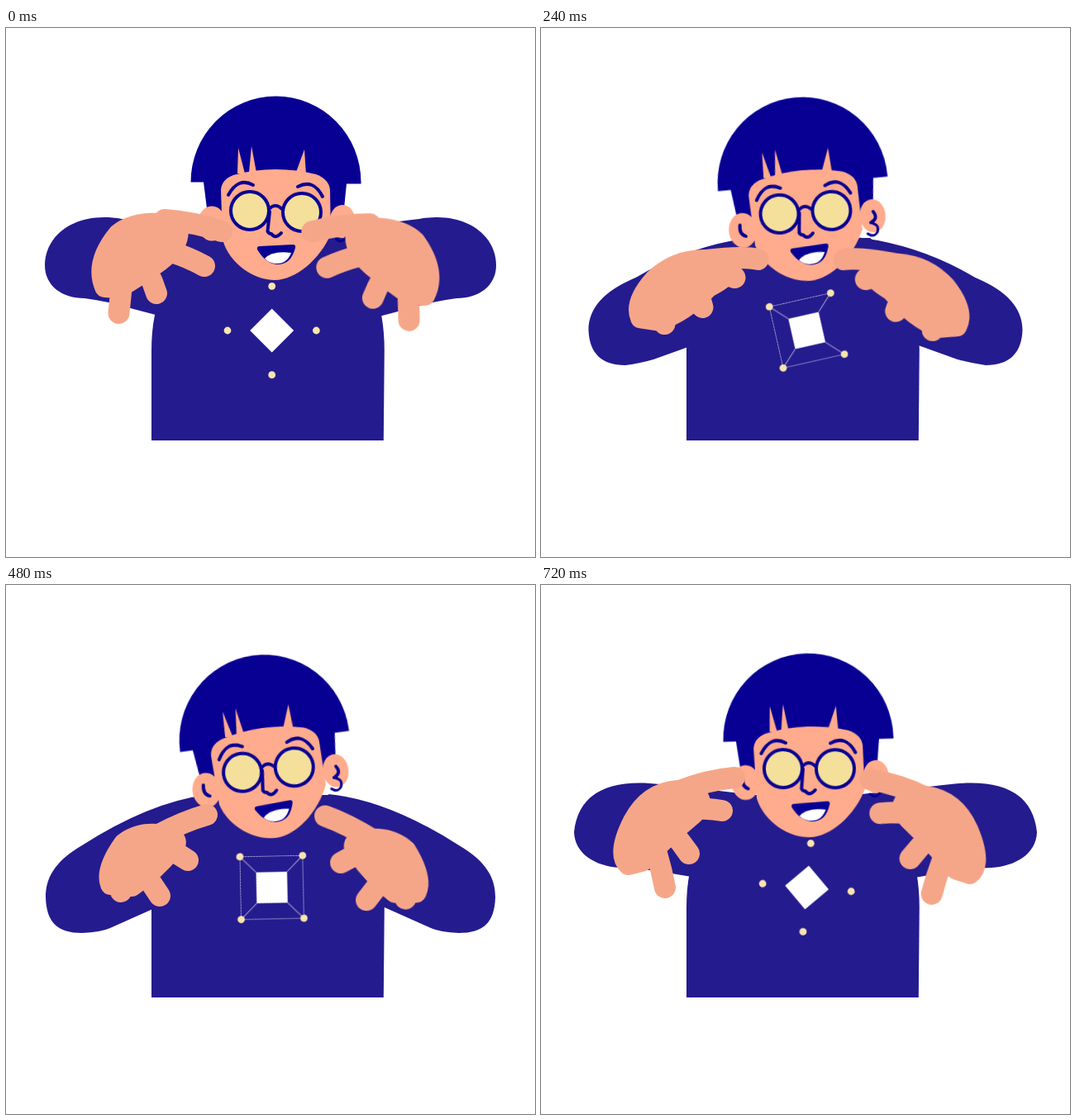
These frames come from a looping animation (640 px wide and 640 px high, 800 ms). An HTML page without scripts:

```html
<!DOCTYPE html>
<html lang="en">
<head>
<meta charset="utf-8">
<title>Waving hands</title>
<style>
html, body { margin: 0; width: 100%; height: 100%; overflow: hidden; background: #fff; }
svg { display: block; width: 100%; height: 100%; }

.sleeve, .hand, .head, .emblem, .frame, .spoke { animation: .8s step-end infinite; }
.cloth { fill: #241b8e; }
.hair { fill: #080093; }
.skin { fill: #ffab8d; }
.ink { fill: none; stroke: #080093; stroke-width: 4; stroke-linecap: round; stroke-linejoin: round; }
.lens { fill: #f4e09b; }
.dots { fill: #f8e5ae; }
.wire { fill: none; stroke: #fff; stroke-opacity: .6; }

/* Palm and four fingers, thickened by a round stroke */
.hand { fill: #f6a688; stroke: #f6a688; stroke-width: 26; stroke-linecap: round; stroke-linejoin: round; animation-name: hand; }
.sleeve { animation-name: sleeve; }
.head { transform-origin: 333px 290px; animation-name: nod; }
.emblem { transform-origin: 321.7px 366px; animation-name: turn; }
.frame { animation-name: trace; }
.spoke { visibility: hidden; }
.first { animation-name: spokes-first; }
.second { animation-name: spokes-second; }

/* Two-step spans hold each pose, then its halfway pose */
@keyframes hand {
  0% { animation-timing-function: steps(2, end);
    d: path("M120 313Q108 284 136 250Q156 232 207 238Q212 262 185 282Q160 300 136 314Z M192 232Q230 235 261 246 M200 271Q220 277 240 288 M172 296Q178 308 182 321 M140 310Q138 330 136.5 345"); }
  20% { animation-timing-function: steps(2, end);
    d: path("M114 337Q104 324 128 292Q160 260 200 260Q275 276 190 303Q165 322 137 330Z M195 261Q240 258 262 253 M205 284Q230 284 251 286 M190 312Q198 325 206 336 M145 325Q150 338 154 351"); }
  40% { animation-timing-function: steps(2, end);
    d: path("M128 364Q122 340 148 317Q168 300 200 302Q222 304 214 323Q178 368 145 377Z M205 301Q250 293 263 307 M205 305Q212 310 218 318 M190 325Q188 333 185 340 M150 350Q148 358 145 365"); }
  60% { d: path("M127 362Q120 345 143 313Q160 300 183 302Q215 305 200 320Q180 345 152 364Z M185 302Q215 286 243 278 M195 318Q208 325 220 333 M170 352Q178 364 186 376 M140 350Q140 360 139 371"); }
  70% { d: path("M126 372Q108 352 126 320Q148 295 178 296Q215 298 190 322Q170 342 150 360Z M175 295Q205 285 219 266 M190 307Q218 297 241 289 M180 322Q200 331 218 341 M145 345Q155 360 166 372"); }
  80% { d: path("M110 363Q92 350 112 312Q135 273 165 274Q205 275 180 297Q150 325 125 356Z M160 276Q190 256 210 242 M180 284Q210 284 234 285 M170 305Q180 314 191 322 M143 335Q150 352 156 367"); }
  90% { d: path("M106 338Q92 325 112 286Q130 252 165 249Q210 255 180 280Q150 305 122 334Z M165 250Q200 236 234 233 M175 270Q200 270 219 273 M160 300Q170 312 179 325 M140 325Q146 345 150 366"); }
}
@keyframes sleeve {
  0% { animation-timing-function: steps(2, end);
    d: path("M262 252Q190 236 140 231C85 221 47 250 47 287C47 312 68 327 95 327Q110 329 124 332L200 352Z"); }
  20% { animation-timing-function: steps(2, end);
    d: path("M260 254Q190 256 138 268C80 284 49 310 49 347C49 373 68 384 100 384Q120 380 140 376L200 368Z"); }
  40% { animation-timing-function: steps(2, end);
    d: path("M250 253Q170 270 93 335C72 352 66 368 66 384C68 415 80 432 104 432Q121 431 132 426L200 388Z"); }
  60% { d: path("M250 253Q178 260 92 315C58 335 48 355 48 378C49 408 62 421 92 421Q115 420 126 415L200 382Z"); }
  70% { d: path("M250 255Q165 262 88 286C45 300 25 325 25 358C26 388 45 398 75 398Q98 398 112 394L200 372Z"); }
  80% { d: path("M255 254Q165 252 110 255C50 258 25 285 21.5 325C22 350 50 365 92 368Q110 368 125 366L200 362Z"); }
  90% { d: path("M260 254Q190 246 144 241C85 234 45 250 40 299C41 325 65 340 95 342Q120 343 140 346L200 356Z"); }
}
@keyframes nod {
  0% { transform: rotate(0deg); }
  10% { transform: rotate(-1.1deg); }
  20% { transform: rotate(-2.9deg); }
  30% { transform: rotate(-5.5deg); }
  40%, 60% { transform: rotate(-7.7deg); }
  50% { transform: rotate(-8.3deg); }
  70% { transform: rotate(-6deg); }
  80% { transform: rotate(-3.7deg); }
  90% { transform: rotate(-1.7deg); }
}
@keyframes turn {
  0% { transform: rotate(0deg); }
  10%, 90% { transform: rotate(5deg); }
  20%, 80% { transform: rotate(17.4deg); }
  30%, 70% { transform: rotate(32.3deg); }
  40%, 60% { transform: rotate(43.8deg); }
  50% { transform: rotate(48deg); }
}
@keyframes trace {
  0%, 90% { stroke-dasharray: 0 9; stroke-dashoffset: 0; }
  10% { stroke-dasharray: .8 9; stroke-dashoffset: 0; }
  20% { stroke-dasharray: 2.22 9; stroke-dashoffset: 0; }
  30%, 50% { stroke-dasharray: 3 9; stroke-dashoffset: -1; }
  40% { stroke-dasharray: 1.78 9; stroke-dashoffset: -2.22; }
  60%, 70% { stroke-dasharray: 4 9; stroke-dashoffset: 0; }
  80% { stroke-dasharray: 1 9; stroke-dashoffset: 0; }
}
@keyframes spokes-first {
  0%, 40%, 80% { visibility: hidden; }
  20%, 50% { visibility: visible; }
}
@keyframes spokes-second {
  0%, 70% { visibility: hidden; }
  30% { visibility: visible; }
}
</style>
</head>
<body>
<svg viewBox="0 0 640 640">
  <g class="cloth">
    <path class="sleeve"/>
    <path class="sleeve" transform="translate(640) scale(-1 1)"/>
    <path d="M176 499V390C176 332 195 285 242 254H398C440 285 457.8 332 457.8 390L456.8 499Z"/>
  </g>

  <g class="emblem">
    <path fill="#fff" d="M321.7 339.5l26.5 26.5-26.5 26.5-26.5-26.5Z"/>
    <g class="wire">
      <path class="frame" pathLength="4" d="M321.7 312.3l53.7 53.7-53.7 53.7-53.7-53.7Z"/>
      <path class="spoke first" d="M348.2 366h27.2M321.7 392.5v27.2"/>
      <path class="spoke second" d="M295.2 366h-27.2M321.7 339.5v-27.2"/>
    </g>
    <g class="dots">
      <circle cx="321.7" cy="312.3" r="4.4"/>
      <circle cx="375.4" cy="366" r="4.4"/>
      <circle cx="321.7" cy="419.7" r="4.4"/>
      <circle cx="268" cy="366" r="4.4"/>
    </g>
  </g>

  <g class="head">
    <path class="hair" d="M223.5 186.5A103 104 0 0 1 326.5 82.5A103 104 0 0 1 429.5 186.5V188.5H412L408 228L391 233L262 238L244 226L239 186.5Z"/>
    <g class="skin">
      <ellipse cx="249" cy="236.5" rx="17" ry="21"/>
      <ellipse cx="407" cy="234" rx="15.5" ry="20"/>
      <path d="M260 196Q261 183 275 178Q300 171 326 171Q352 171 375 177Q391 183 392 196L393 249C380 280 350 305 325 305C300 305 270 285 262 256Z"/>
      <path d="M281 145L289 176H280ZM297 143L303 175H294ZM361 147L363 177H350Z"/>
    </g>
    <g class="ink">
      <path d="M246 230Q244 241 252 244M408 229Q414 238 404 242"/>
      <path stroke-width="3" d="M406 243Q414 246 411 254Q406 261 399 255"/>
      <path d="M269 202Q281 180 299 190M353 192Q372 182 383 204"/>
      <circle class="lens" cx="295" cy="221" r="23"/>
      <circle class="lens" cx="358" cy="223" r="23"/>
      <path d="M318 219Q326 211 334 219M319 222L316.5 246Q318 249 321 249Q326 256 333 248"/>
    </g>
    <path class="hair" d="M307 264L347 262Q351 262 350 266C346 280 340 286 328 286Q314 285 304 268Q303 264 307 264Z"/>
    <path fill="#fff" d="M313 279Q322 269 345 272Q340 285 328 285Q319 285 313 279Z"/>
  </g>

  <path class="hand"/>
  <path class="hand" transform="rotate(4 365 265) translate(630) scale(-1 1)"/>
</svg>
</body>
</html>
```
